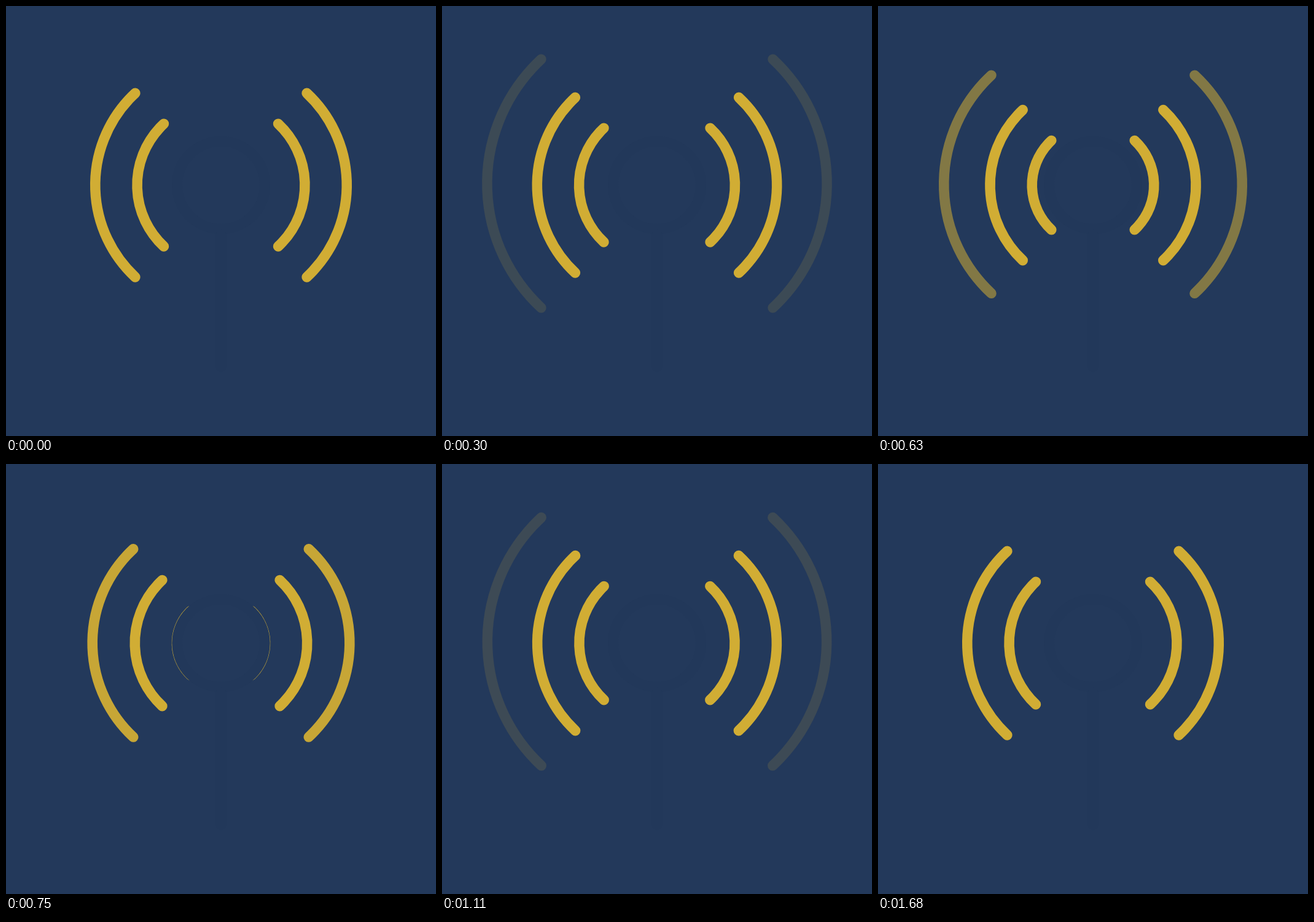
Animation of 700 by 700 pixels, one loop 3060 ms. Source, as an HTML page with a canvas:

```html
<!DOCTYPE html>
<html lang="en">
<head>
<meta charset="utf-8">
<title>Antenna signal</title>
<style>
  html, body { margin: 0; width: 100%; height: 100%; overflow: hidden; background: #23395b; }
  canvas { display: block; width: 100vw; height: 100vh; }
</style>
</head>
<body>
<canvas id="stage" width="700" height="700"></canvas>
<script>
const ctx = document.getElementById('stage').getContext('2d');
const BACKGROUND = '#23395b', MAST = '#22385a', SIGNAL = '#d1ad34';
const LOOP = 3060, TICK = 30;
const CX = 350, CY = 291.6, STEP = 68.25, FADE_TRAVEL = 83.5;
const HALF_ANGLE = 47 * Math.PI / 180;

// Timeline in ms: one slow first pulse, four even ones, then overshoot and settle.
const FIRST_PULSE = 339, PULSE = 200, PULSES_END = FIRST_PULSE + 4 * PULSE;
const PEAK = 1290, OVERSHOOT = 20.2, OUTER_REST = 1620, INNER_REST = 1670;

const clamp = x => Math.min(1, Math.max(0, x));
const smooth = x => x * x * (3 - 2 * x);

// Starts at rest and ends at linear speed: cubic-bezier(.333, 0, .833, .833).
function easeIn(x) {
  const bezier = (s, a, b) => 3 * (1 - s) ** 2 * s * a + 3 * (1 - s) * s * s * b + s ** 3;
  let low = 0, high = 1;
  for (let i = 0; i < 24; i++) {
    const mid = (low + high) / 2;
    if (bezier(mid, .333, .833) < x) low = mid; else high = mid;
  }
  return bezier(low, 0, .833);
}

function pulsePhase(t) {
  return t < FIRST_PULSE ? easeIn(t / FIRST_PULSE) : (t - FIRST_PULSE) / PULSE % 1;
}

function overshoot(t, rest) {
  if (t < PEAK) return OVERSHOOT * (1 - (1 - (t - PULSES_END) / (PEAK - PULSES_END)) ** 2);
  return OVERSHOOT * (1 - smooth(clamp((t - PEAK) / (rest - PEAK))));
}

function wave(radius, alpha = 1, cy = CY) {
  ctx.globalAlpha = alpha;
  ctx.strokeStyle = SIGNAL;
  for (const facing of [0, Math.PI]) {
    ctx.beginPath();
    ctx.arc(CX, cy, radius, facing - HALF_ANGLE, facing + HALF_ANGLE);
    ctx.stroke();
  }
  ctx.globalAlpha = 1;
}

function mast() {
  ctx.strokeStyle = MAST;
  ctx.fillStyle = BACKGROUND;
  ctx.beginPath();
  ctx.arc(CX, CY, 71.5, 0, 2 * Math.PI);
  ctx.fill();
  ctx.stroke();
  ctx.beginPath();
  ctx.moveTo(CX, 372);
  ctx.lineTo(CX, 588);
  ctx.stroke();
}

function draw(t) {
  ctx.fillStyle = BACKGROUND;
  ctx.fillRect(0, 0, 700, 700);
  ctx.lineWidth = 16.6;
  ctx.lineCap = 'round';
  if (t < PULSES_END) {
    const p = pulsePhase(t);
    wave(STEP * (1 + p));
    wave(STEP * (2 + p));
    wave(STEP * 3 + FADE_TRAVEL * p, 1 - p, CY - 3 * p);
  } else {
    wave(STEP * 2 + overshoot(t, INNER_REST));
    wave(STEP * 3 + overshoot(t, OUTER_REST));
  }
  mast();
}

function frame() {
  const t = performance.now() % LOOP;
  draw(Math.floor(t / TICK) * TICK);
  requestAnimationFrame(frame);
}
frame();
</script>
</body>
</html>
```
